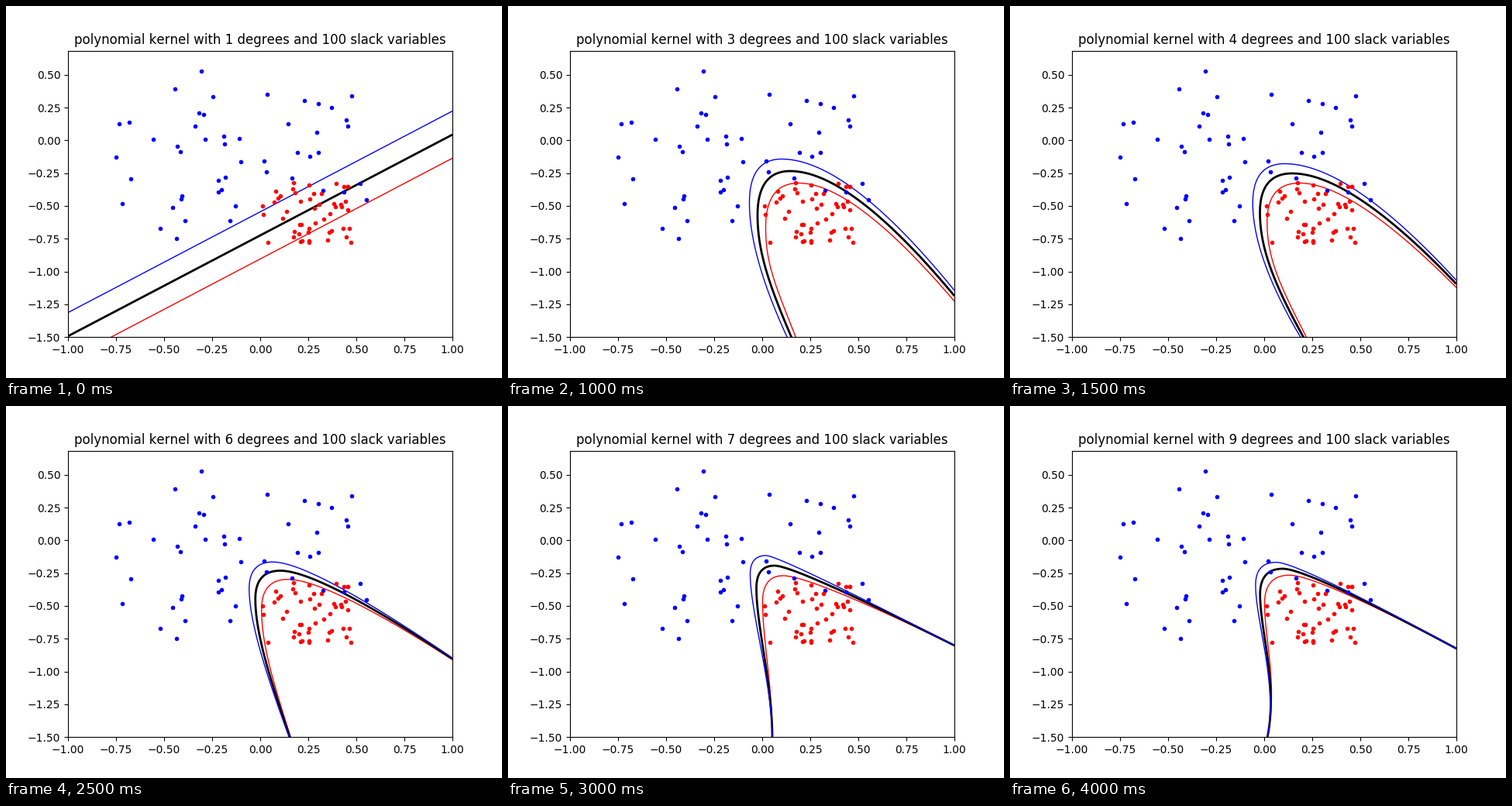
A matplotlib script for the animation above (4.5 s loop, 640 by 480 pixels).

```python
import numpy as np
import matplotlib.pyplot as plt
from matplotlib.animation import FuncAnimation

plt.rcParams["text.kerning_factor"] = 6

STEP_MS = 500
DEGREES = 9
DOTS = 50
RIGHT, BOTTOM = 576, 428
# colour, line width, side of the boundary
LEVELS = (("red", 1, 1), ("black", 2, 0), ("blue", 1, -1))

# Boundary in stage pixels: right end y, right bend x, peak x y,
# leftmost x y, lower bend x, bottom end x
KEY_DEGREES = (3, 5, 7, 9)
BOUNDARY = np.array([
    [374, 442, 364, 213, 322, 270, 337, 366],
    [343.5, 438, 364, 219, 323, 263, 346, 392],
    [309, 370, 344, 206, 320.5, 235, 341, 341],
    [313, 384, 352, 210, 322.7, 243, 346, 332]])
# How far each of these moves from the boundary to a margin
MARGIN = np.array([
    [7, 4, 11, 15.5, 10.5, 16, 8, 5.5],
    [2.2, 0, 8.5, 9.5, 8, 8.5, 5, 2],
    [0, 20, 11, 13, 8, 18, 0, 0],
    [0, 12, 8.5, 8.3, 5.8, 12, 0, 0]])


def to_data(x, y):
    return (x - 80) / 248 - 1, -1.5 + (427.2 - y) * 2.184 / 369.6


def bezier(*points):
    """Curve of any order by repeated interpolation."""
    t = np.linspace(0, 1, 40)[:, None]
    p = [np.array(q, float) for q in points]
    while len(p) > 1:
        p = [a + (b - a) * t for a, b in zip(p, p[1:])]
    return p[0]


def at_degree(table, degree):
    return np.array([np.interp(degree, KEY_DEGREES, col) for col in table.T])


def horn(degree, side):
    """Right arm, rounded peak and lower arm of one level line."""
    key = at_degree(BOUNDARY, degree) + side * at_degree(MARGIN, degree)
    end, bend, px, py, lx, ly, low, foot = key
    peak, left = (px, py), (lx, ly)
    return np.vstack([
        bezier((RIGHT, end), (bend, py), peak),
        bezier(peak, (lx, py), left),
        bezier(left, (lx, ly + 47), (low, 360), (foot, BOTTOM))]).T


def level(degree, side):
    """Pixel path of one level line."""
    x = np.linspace(80, RIGHT, 100)
    if degree == 1:
        return x, 426 - (x - 80) * 260 / 496 + 30.4 * side
    if degree == 2:
        u = (x - 308) / 250
        return x, 242.5 - 45.7 * u ** 2 - 7.29 * u ** 3 - 1.5 * side
    return horn(degree, side)


# Blue dots fan out around the box that holds the red ones
rng = np.random.default_rng(7)
angle = np.radians(rng.uniform(-20, 255, DOTS))
radius = (0.75 + 0.1 * np.sin(angle)) * rng.random(DOTS) ** 0.6
blue = -0.05 + radius * np.cos(angle), -0.25 + radius * np.sin(angle)
red = rng.uniform(0.01, 0.48, DOTS), rng.uniform(-0.79, -0.31, DOTS)

fig, ax = plt.subplots(figsize=(6.4, 4.8), dpi=100)
lines = [ax.plot([], [], color=c, lw=w, solid_capstyle="butt")[0]
         for c, w, _ in LEVELS]
ax.plot(*blue, ".", color="blue")
ax.plot(*red, ".", color="red")
ax.set_xlim(-1, 1)
ax.set_ylim(-1.5, 0.684)
title = ax.set_title("")


def update(frame):
    degree = frame + 1
    title.set_text(f"polynomial kernel with {degree} degrees and 100 slack variables")
    for line, (_, _, side) in zip(lines, LEVELS):
        line.set_data(*to_data(*level(degree, side)))
    return [*lines, title]


anim = FuncAnimation(fig, update, frames=DEGREES, interval=STEP_MS,
                     repeat=True, repeat_delay=0, blit=False)
plt.show()
```
